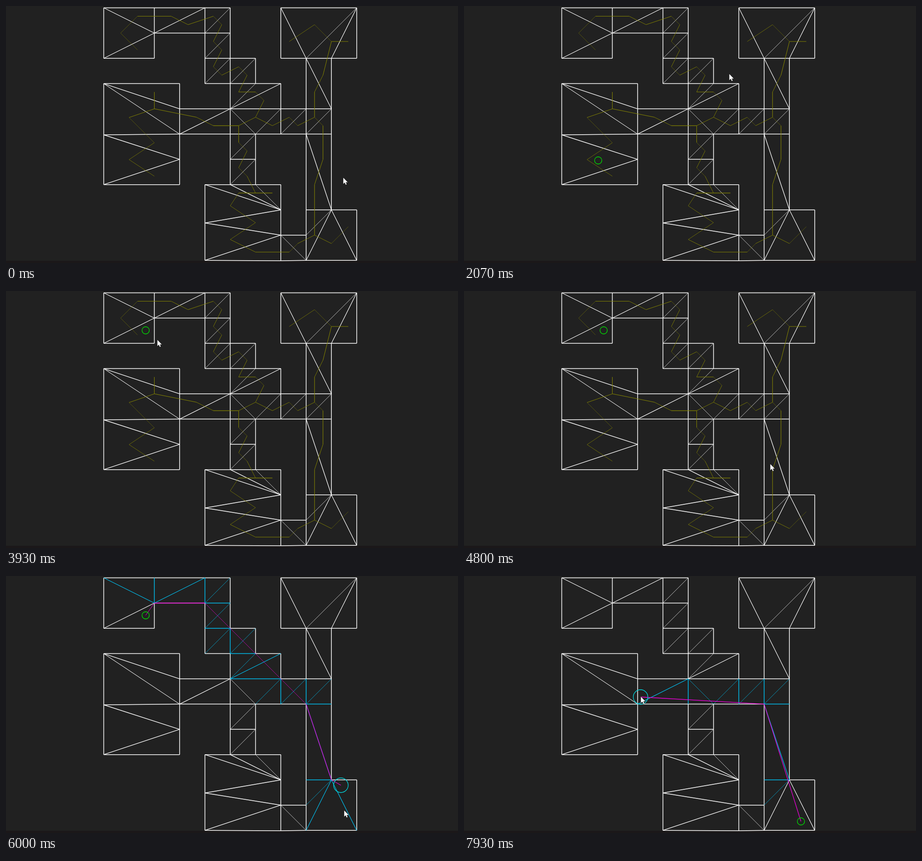
An HTML page with a canvas that plays this animation: 992 by 565 pixels, repeating every 8 s.

```html
<!DOCTYPE html>
<html lang="en">
<head>
<meta charset="utf-8">
<title>Navigation mesh</title>
<style>
  html, body { margin: 0; width: 100%; height: 100%; overflow: hidden; background: #212121; }
  canvas { display: block; }
</style>
</head>
<body>
<canvas id="stage" width="992" height="565"></canvas>
<script>
const ctx = document.getElementById('stage').getContext('2d');
const LOOP = 8000, STEP = 200 / 3, CELL = 55.52;
const WHITE = '#fff', GRAPH = '#858500', PORTAL = '#00bff0', PATH = '#f000dc';

// A corner is a column and a row digit, "a" meaning ten. A few rows sit off the grid.
const shift = { '05': 0.03, '48': 0.52, '7a': 0.015 };
const corner = id => [
  214.5 + CELL * parseInt(id[0], 16),
  4 + CELL * (parseInt(id[1], 16) + (shift[id] || 0))
];
const dist = (p, q) => Math.hypot(p[0] - q[0], p[1] - q[1]);

// Triangle strips: each further corner replaces the farthest one.
const strips = [
  '22 02 21 00 20 40 41 50 51 42 52 43 53 62 63 54',
  '63 54 73',
  '54 73 74 65 75 84 85 94 95 98 88 89',
  '89 98 8a aa a8',
  '89 8a 79 7a 4a 48 78 47',
  '47 78 57 67 77',
  '67 57 66 56 65 55 54 35 34 03 05 36 07 37',
  '03 34 33',
  '94 84 82 92 a0',
  '82 a0 70 72',
  '92 a0 a2'
];

const tris = [];
for (const strip of strips) {
  let tri = [];
  for (const id of strip.split(' ')) {
    if (tri.length === 3) {
      const gap = tri.map(v => dist(corner(v), corner(id)));
      const far = Math.max(...gap) - 1e-6;
      const drop = gap.findIndex(d => d >= far);
      tri = tri.filter((v, i) => i !== drop);
    }
    tri = [...tri, id];
    if (tri.length === 3) tris.push(tri);
  }
}

// Edges with the triangles on either side
const edges = new Map();
tris.forEach((tri, n) => tri.forEach((v, i) => {
  const key = [v, tri[(i + 1) % 3]].sort().join(' ');
  if (!edges.has(key)) edges.set(key, []);
  edges.get(key).push(n);
}));
const ends = key => key.split(' ').map(corner);
const links = [...edges].filter(([, sides]) => sides.length === 2);
const centre = n => [0, 1].map(k => tris[n].reduce((s, v) => s + corner(v)[k], 0) / 3);

function triangleAt(p) {
  return tris.findIndex(tri => {
    const c = tri.map(corner);
    const side = c.map((a, i) => {
      const b = c[(i + 1) % 3];
      return (b[0] - a[0]) * (p[1] - a[1]) - (b[1] - a[1]) * (p[0] - a[0]);
    });
    return side.every(s => s >= 0) || side.every(s => s <= 0);
  });
}

// Edges crossed between two points, without the first
function portals(from, to) {
  const first = triangleAt(from), last = triangleAt(to);
  const came = new Map([[first, null]]);
  const queue = [first];
  for (const n of queue) {
    for (const [key, sides] of links) {
      if (!sides.includes(n)) continue;
      const next = sides[0] === n ? sides[1] : sides[0];
      if (!came.has(next)) { came.set(next, { key, n }); queue.push(next); }
    }
  }
  const keys = [];
  for (let s = came.get(last); s; s = came.get(s.n)) keys.unshift(s.key);
  return new Set(keys.slice(1));
}

const trips = [
  { pick: 1600, go: 2800, from: [294.5, 339.5], to: [739.5, 94.5], turns: ['35', '84', '92'] },
  { pick: 3800, go: 5330, from: [306.5, 86.5], to: [735, 460], turns: ['21', '41', '85', '98'] },
  { pick: 6730, go: 7930, from: [739.5, 539.5], to: [387.5, 266], turns: ['85'] }
];
for (const trip of trips) {
  trip.crossed = portals(trip.from, trip.to);
  trip.line = [trip.from, ...trip.turns.map(corner), trip.to];
}

// time, x, y of the pointer
const moves = [
  [0, 740, 378], [250, 690, 404], [450, 500, 350], [600, 326, 290], [730, 370, 250],
  [870, 430, 254], [1000, 457, 280], [1200, 400, 360], [1330, 330, 370], [1470, 296, 341],
  [1600, 294, 339], [1733, 295, 328], [2066, 582, 150], [2333, 712, 70], [2467, 729, 66],
  [2600, 729, 84], [2666, 739, 94], [2800, 739, 94], [2933, 520, 50], [3066, 282, 25],
  [3200, 272, 50], [3400, 300, 87], [3530, 301, 87], [3600, 305, 86], [3860, 305, 86],
  [4200, 430, 190], [4800, 672, 381], [5130, 728, 448], [5266, 735, 460], [5530, 735, 460],
  [6000, 742, 516], [6333, 751, 529], [6533, 740, 539], [6733, 740, 539], [7133, 482, 344],
  [7400, 385, 276], [7533, 373, 267], [7733, 388, 266], [8000, 388, 266]
];

function pointerAt(t) {
  const i = Math.max(1, moves.findIndex(m => m[0] > t));
  const [t0, x0, y0] = moves[i - 1], [t1, x1, y1] = moves[i];
  const k = (t - t0) / (t1 - t0);
  return [Math.round(x0 + (x1 - x0) * k), Math.round(y0 + (y1 - y0) * k)];
}

// Slanted lines come out thinner than level ones.
function line(a, b, colour, weight) {
  const dx = a[0] - b[0], dy = a[1] - b[1];
  const lean = Math.max(dx * dx, dy * dy) / (dx * dx + dy * dy);
  ctx.strokeStyle = colour;
  ctx.lineWidth = weight * lean;
  ctx.beginPath();
  ctx.moveTo(...a);
  ctx.lineTo(...b);
  ctx.stroke();
}

function ring(p, r, colour) {
  ctx.strokeStyle = colour;
  ctx.lineWidth = 1.3;
  ctx.beginPath();
  ctx.arc(p[0], p[1], r, 0, 7);
  ctx.stroke();
}

const arrow = new Path2D('M0 0V13.5L3.2 10.6 5.3 15.5 7.4 14.6 5.3 9.9H9.6Z');
function pointer(p) {
  ctx.save();
  ctx.translate(p[0] + 0.3, p[1] - 0.5);
  ctx.strokeStyle = '#111';
  ctx.lineWidth = 1;
  ctx.stroke(arrow);
  ctx.fillStyle = WHITE;
  ctx.fill(arrow);
  ctx.restore();
}

function draw(t) {
  const trip = trips.filter(s => t >= s.pick).pop();
  const found = trip && t >= trip.go;

  ctx.fillStyle = '#212121';
  ctx.fillRect(0, 0, 992, 565);
  ctx.fillStyle = '#1b1819';
  ctx.fillRect(0, 560, 992, 5);

  for (const key of edges.keys()) {
    if (!found || !trip.crossed.has(key)) line(...ends(key), WHITE, 1.5);
  }
  if (found) {
    for (const key of trip.crossed) line(...ends(key), PORTAL, 1.5);
    trip.line.slice(1).forEach((p, i) => line(trip.line[i], p, PATH, 1.4));
    ring(trip.to, 16, '#00d8e0');
  } else {
    for (const [, [a, b]] of links) line(centre(a), centre(b), GRAPH, 1.1);
  }
  if (trip) ring(trip.from, 8, '#00e600');
  pointer(pointerAt(Math.floor((t + 5) / STEP) * STEP % LOOP));
}

function tick() {
  draw(performance.now() % LOOP);
  requestAnimationFrame(tick);
}
tick();
</script>
</body>
</html>
```
